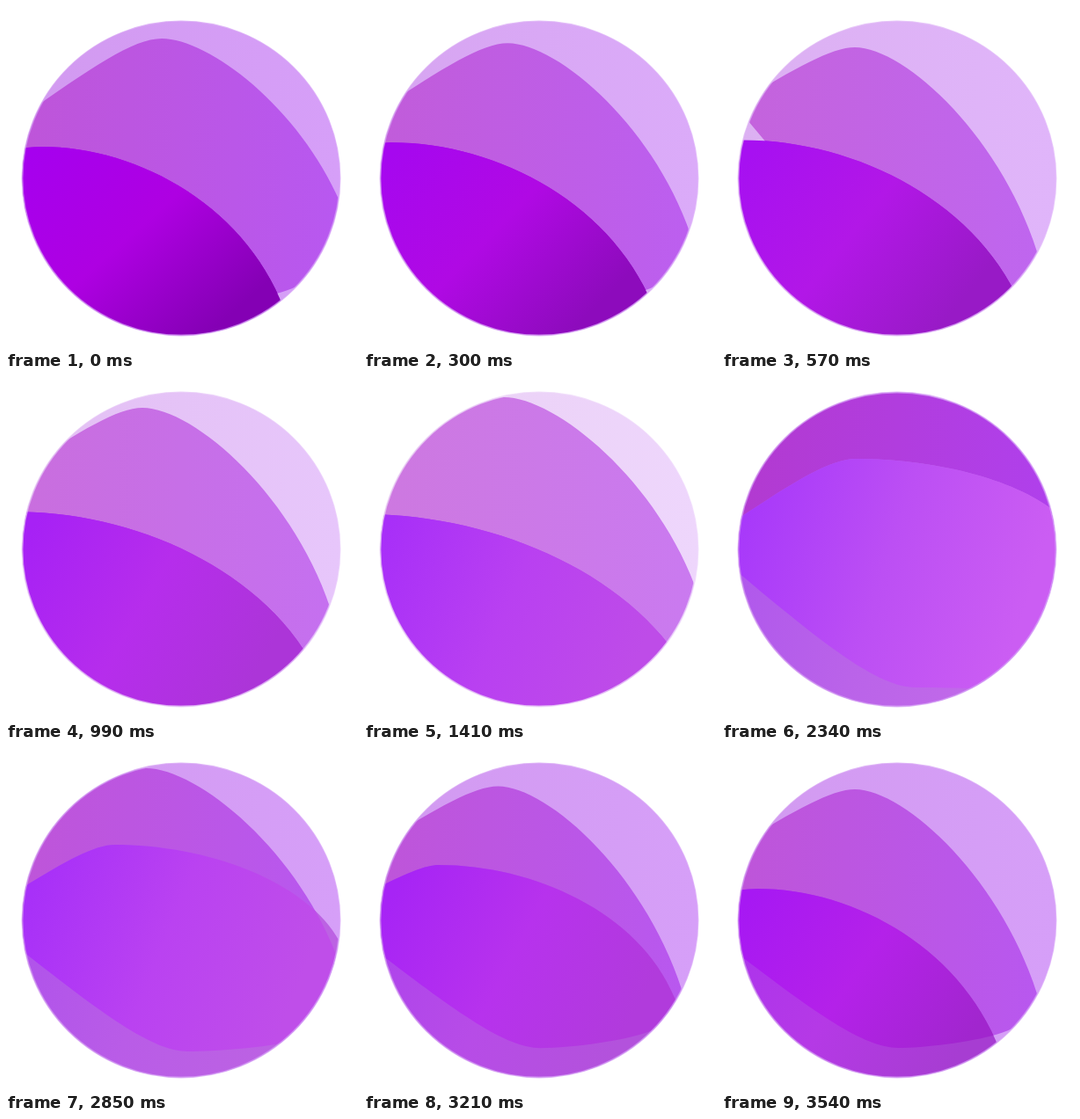
An HTML page with a canvas for the animation above (3840 ms loop, 400x390 px).

```html
<!DOCTYPE html>
<html lang="en">
<head>
<meta charset="utf-8">
<title>Purple orb</title>
<style>
html, body { margin: 0; width: 100%; height: 100%; overflow: hidden; background: #fff; }
canvas { display: block; width: 400px; height: 390px; }
</style>
</head>
<body>
<canvas id="stage" width="400" height="390"></canvas>
<script>
const ctx = document.getElementById('stage').getContext('2d');
const LOOP = 3840, STEP = 30, LAST = 3540;

const mix = (a, b, k) => a.map((v, i) => Array.isArray(v) ? mix(v, b[i], k) : v + (b[i] - v) * k);
const ramp = (t, from, to) => Math.max(0, Math.min(1, (t - from) / (to - from)));
const bump = (t, from, to) => Math.sin(Math.PI * ramp(t, from, to));

// Every edge is a hill: left foot, summit, right foot.
const crest = {
  high: [[5, 135], [177, 37], [390, 250]],
  low: [[14, 112], [151, 47], [362, 292]],
  near: [[0, 110], [159, 23], [383, 257]],
  aside: [[12, 140], [230, 5], [430, 230]],
  above: [[-10, 110], [200, -110], [450, 150]]
};
const front = {
  rest: [[-10, 166], [40, 160], [320, 355]],
  wide: [[-60, 170], [0, 156], [380, 360]],
  raised: [[-10, 180], [152, 93], [400, 175]]
};
const keel = {
  rest: [[-20, 205], [200, 341], [330, 319]],
  dropped: [[-20, 175], [240, 365], [345, 395]]
};

function crestAt(t) {
  const { high, low, near, aside, above } = crest;
  if (t < 570) return mix(high, low, t / 570);
  if (t < 1410) return mix(low, near, ramp(t, 570, 1410));
  if (t < 1740) return mix(near, aside, ramp(t, 1410, 1740));
  if (t < 2340) return mix(aside, above, ramp(t, 1740, 2340));
  if (t < 2850) return mix(above, near, ramp(t, 2340, 2850));
  return mix(near, low, ramp(t, 2850, 3270));
}

function frontAt(t) {
  const { rest, wide, raised } = front;
  if (t > 2340) return mix(raised, rest, ramp(t, 2340, LAST) ** 1.6);
  const pose = mix(mix(rest, wide, ramp(t, 0, 1410)), raised, ramp(t, 1740, 2340));
  const swell = 6 * bump(t, 0, 1300);
  return pose.map(([x, y]) => [x, y - swell]);
}

function keelAt(t) {
  const drop = ramp(t, 600, 1740) * (1 - ramp(t, 1740, 3270)) ** 1.4;
  const [left, ...others] = mix(keel.rest, keel.dropped, drop);
  return [[left[0] + 112 * bump(t, 0, 1140) ** 2, left[1]], ...others];
}

// Bezier points of a hill; a larger reach gives a fuller shoulder.
function hill([left, top, right], reach) {
  const between = (a, b, u, v) => [a[0] + (b[0] - a[0]) * u, a[1] + (b[1] - a[1]) * v];
  return [left, between(left, top, .5, .62), between(left, top, .8, 1), top,
    between(top, right, reach, 0),
    between(top, right, .73 + .3 * reach, .57 - .53 * reach), right];
}

function addCurve(path, points) {
  path.lineTo(...points[0]);
  for (let i = 1; i < points.length; i += 3)
    path.bezierCurveTo(...points[i], ...points[i + 1], ...points[i + 2]);
}

const palette = text => text.split(' ').map(hex => [0, 2, 4].map(i => parseInt(hex.slice(i, i + 2), 16)));
const base = palette('d29af0 d69ff8'), basePale = palette('ead0f4 eed6fc');
const back = palette('be55d9 b858f0'), backPale = palette('cd78e0 ca7af0'), backDark = palette('b23ad0 b040ec');
const deep = palette('a600ee ae00e2 8400b4'), bright = palette('a83afa bc50f4 cc5ef4');
const [veil] = palette('b87cdc');

function gradient(colours, from, to) {
  const fill = ctx.createLinearGradient(...from, ...to);
  colours.forEach((c, i) => fill.addColorStop(i / (colours.length - 1), `rgb(${c.map(Math.round)})`));
  return fill;
}

const orb = new Path2D();
orb.ellipse(199, 196, 180.5, 178.5, 0, 0, Math.PI * 2);

function draw(t) {
  const blob = new Path2D(), wave = new Path2D();
  addCurve(blob, hill(crestAt(t), .27));
  addCurve(blob, hill(keelAt(t), .27).reverse());
  blob.closePath();
  addCurve(wave, hill(frontAt(t), .4));
  wave.lineTo(420, 420);
  wave.lineTo(-60, 420);
  wave.closePath();

  const pale = ramp(t, 0, 1410) * (1 - ramp(t, 1410, 1740));
  const dark = ramp(t, 1740, 2340) * (1 - ramp(t, 2340, 2850));
  const glow = Math.sin(Math.PI * t / 4300) ** 1.4;
  const haze = .45 * ramp(t, 1600, 2300) * (1 - .4 * ramp(t, 2850, LAST));
  const shared = mix(deep, bright, glow);
  const from = mix([50, 150], [20, 180], glow), to = mix([240, 365], [340, 280], glow);
  const baseFill = gradient(mix(base, basePale, pale), [20, 0], [380, 0]);

  ctx.clearRect(0, 0, 400, 390);
  ctx.save();
  ctx.clip(orb);
  ctx.fillStyle = baseFill;
  ctx.fillRect(0, 0, 400, 390);
  ctx.fillStyle = gradient(mix(mix(back, backPale, pale), backDark, dark), [20, 0], [380, 0]);
  ctx.fill(blob);
  ctx.fillStyle = gradient(shared.map(c => mix(c, veil, haze)), from, to);
  ctx.fill(wave);
  ctx.clip(wave);
  ctx.fillStyle = gradient(shared, from, to);
  ctx.fill(blob);
  ctx.restore();
  ctx.globalAlpha = .75;
  ctx.strokeStyle = baseFill;
  ctx.lineWidth = 1.8;
  ctx.stroke(orb);
  ctx.globalAlpha = 1;
}

const start = performance.now();
function tick() {
  const t = (performance.now() - start) % LOOP;
  draw(Math.min(LAST, Math.floor(t / STEP) * STEP));
  requestAnimationFrame(tick);
}
tick();
</script>
</body>
</html>
```
